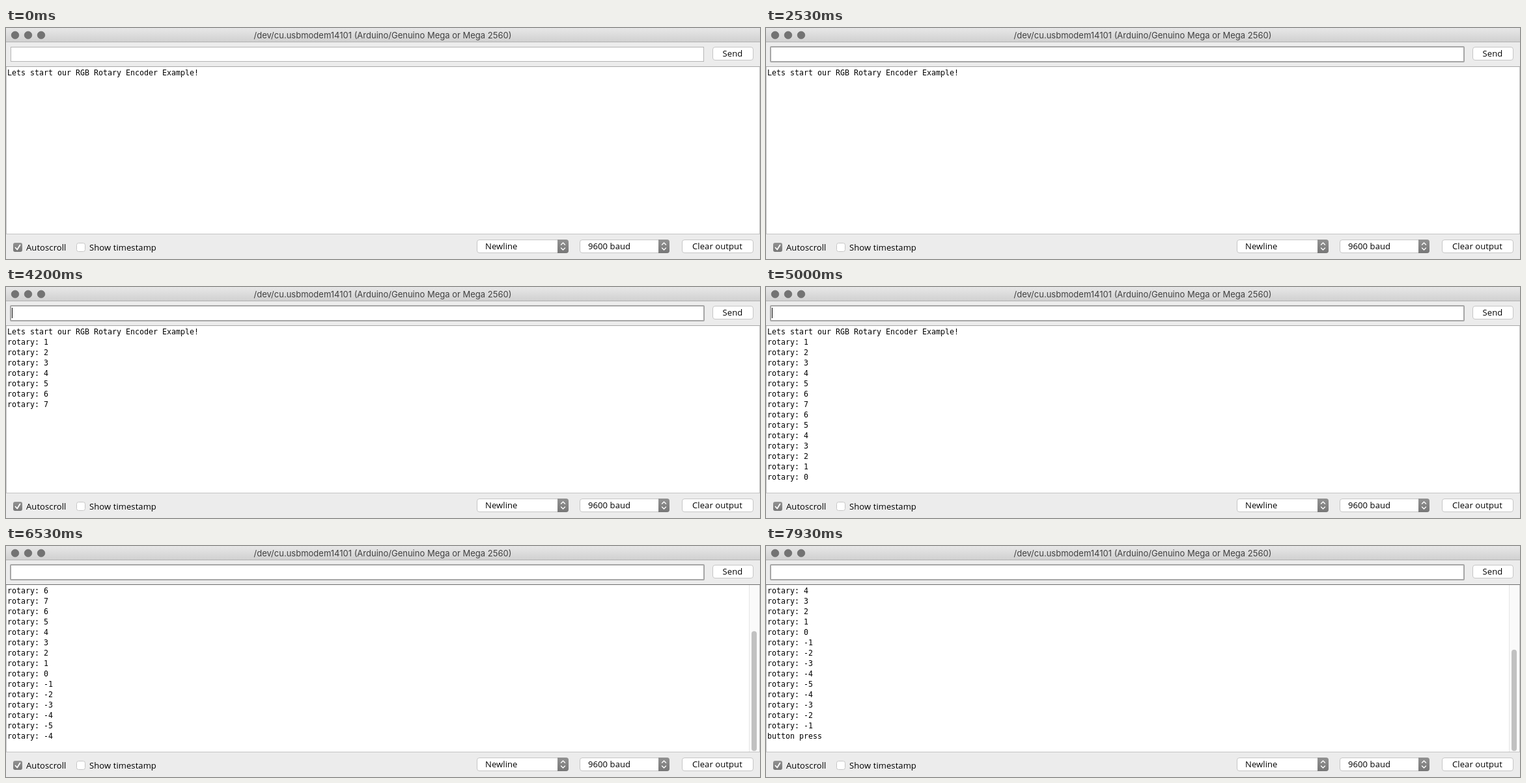
Write an HTML page that moves like this. It is 1158x356 px and loops after 8000 ms.

```html
<!DOCTYPE html>
<html lang="en">
<head>
<meta charset="utf-8">
<title>Serial monitor</title>
<style>
html, body { margin: 0; width: 100%; height: 100%; overflow: hidden; background: #ececec; }
svg { display: block; width: 1158px; height: 356px; }
text { white-space: pre; }
.ui { font: 500 13px "Open Sans", "Noto Sans", sans-serif; letter-spacing: .1px; }
.title { font: 13px Inter, sans-serif; fill: #404040; text-anchor: middle; }
#log { font: 11.63px "DejaVu Sans Mono", monospace; }
.box { fill: #fff; stroke: #c6c6c6; }
.chevron { fill: none; stroke: #fff; stroke-width: 1.4; stroke-linecap: round; stroke-linejoin: round; }
</style>
</head>
<body>
<svg viewBox="0 0 1158 356">
  <defs>
    <linearGradient id="bar" x2="0" y2="1">
      <stop stop-color="#e7e7e7"/><stop offset="1" stop-color="#d1d1d1"/>
    </linearGradient>
    <linearGradient id="knob" x2="0" y2="1">
      <stop stop-color="#929292"/><stop offset="1" stop-color="#777"/>
    </linearGradient>
    <g id="stepper">
      <path d="M0 0h13a4 4 0 0 1 4 4v13a4 4 0 0 1-4 4H0z" fill="url(#knob)"/>
      <path class="chevron" d="M5.5 8l3-3 3 3M5.5 13l3 3 3-3"/>
    </g>
  </defs>

  <rect width="1158" height="356" fill="#ececec"/>
  <rect width="1158" height="21" fill="url(#bar)"/>
  <rect y="21" width="1158" height="1" fill="#b1b1b1"/>
  <g fill="#737373" stroke="#626262" stroke-width=".6">
    <circle cx="14" cy="11" r="5.8"/><circle cx="34" cy="11" r="5.8"/><circle cx="54" cy="11" r="5.8"/>
  </g>
  <text class="title" x="578.5" y="15.5">/dev/cu.usbmodem14101 (Arduino/Genuino Mega or Mega 2560)</text>

  <rect x="7.5" y="29.5" width="1064" height="22" fill="#fff" stroke="#b5b5b5"/>
  <rect id="ring" x="7" y="29" width="1065" height="23" fill="none" stroke="#a6a6a6" stroke-width="2" rx="1"/>
  <rect id="caret" x="9" y="32" width="1" height="16"/>

  <rect y="59" width="1158" height="259" fill="#fff"/>
  <path d="M.5 59v259M1157.5 59v259M0 317.5h1158" stroke="#c4c4c4"/>
  <rect id="edge" y="59" width="1158" height="1"/>
  <g id="log"></g>
  <g id="scroll">
    <rect x="1141" y="60" width="16" height="257" fill="#fafafa"/>
    <rect x="1141" y="60" width="1" height="257" fill="#e6e6e6"/>
    <rect id="thumb" x="1145" width="8" rx="4" fill="#c1c1c1"/>
  </g>

  <g class="box">
    <rect x="1085.5" y="29.5" width="62" height="20" rx="3.5"/>
    <rect x="108.5" y="331.5" width="13" height="13" rx="3"/>
    <rect x="723.5" y="326.5" width="140" height="20" rx="3.5"/>
    <rect x="881.5" y="326.5" width="137" height="20" rx="3.5"/>
    <rect x="1038.5" y="326.5" width="109" height="20" rx="3.5"/>
  </g>
  <rect x="11" y="331" width="14" height="14" rx="3" fill="url(#knob)"/>
  <path class="chevron" d="M14.5 338.5l2.7 3 4.3-7" style="stroke-width:1.8"/>
  <use href="#stepper" x="847" y="326"/>
  <use href="#stepper" x="1002" y="326"/>
  <g class="ui">
    <text x="1100.5" y="44">Send</text>
    <text x="31" y="343">Autoscroll</text>
    <text x="128" y="343">Show timestamp</text>
    <text x="736" y="341">Newline</text>
    <text x="894" y="341">9600 baud</text>
    <text x="1054" y="341">Clear output</text>
  </g>
</svg>
<script>
const LOOP = 8000, ROWS = 15, PITCH = 16;
const $ = id => document.getElementById(id);
const show = (el, on) => el.setAttribute('visibility', on ? 'visible' : 'hidden');

// Output lines, each with the time it arrives
const output = [{ at: 0, text: 'Lets start our RGB Rotary Encoder Example!' }];
function turn(from, to, start, gap) {
  const step = Math.sign(to - from) || 1;
  for (let i = 0; i <= Math.abs(to - from); i++)
    output.push({ at: start + i * gap, text: 'rotary: ' + (from + i * step) });
}
turn(1, 7, 3130, 150);
turn(6, 0, 4330, 100);
turn(-1, -5, 5650, 150);
turn(-4, -1, 6500, 75);
output.push({ at: 7800, text: 'button press' });

const rows = Array.from({ length: ROWS }, (_, i) => {
  const row = document.createElementNS('http://www.w3.org/2000/svg', 'text');
  row.setAttribute('x', 2);
  row.setAttribute('y', 73 + i * PITCH);
  return $('log').appendChild(row);
});

function draw(t) {
  const focused = t >= 70;
  show($('ring'), focused);
  show($('caret'), focused && t % 1000 < 530);

  const lines = output.filter(line => line.at <= t);
  const first = Math.max(0, lines.length - ROWS);
  rows.forEach((row, i) => {
    const line = lines[first + i];
    row.textContent = line ? line.text : '';
  });

  show($('scroll'), first > 0);
  show($('thumb'), first > 0);
  $('edge').setAttribute('fill', first ? '#6c6c6c' : '#a8a8a8');
  const size = 253 * 257 / ((lines.length + 1) * PITCH);
  $('thumb').setAttribute('y', 316 - size);
  $('thumb').setAttribute('height', size);
}

const start = performance.now();
function tick() {
  draw((performance.now() - start) % LOOP);
  requestAnimationFrame(tick);
}
draw(0);
requestAnimationFrame(tick);
</script>
</body>
</html>
```
